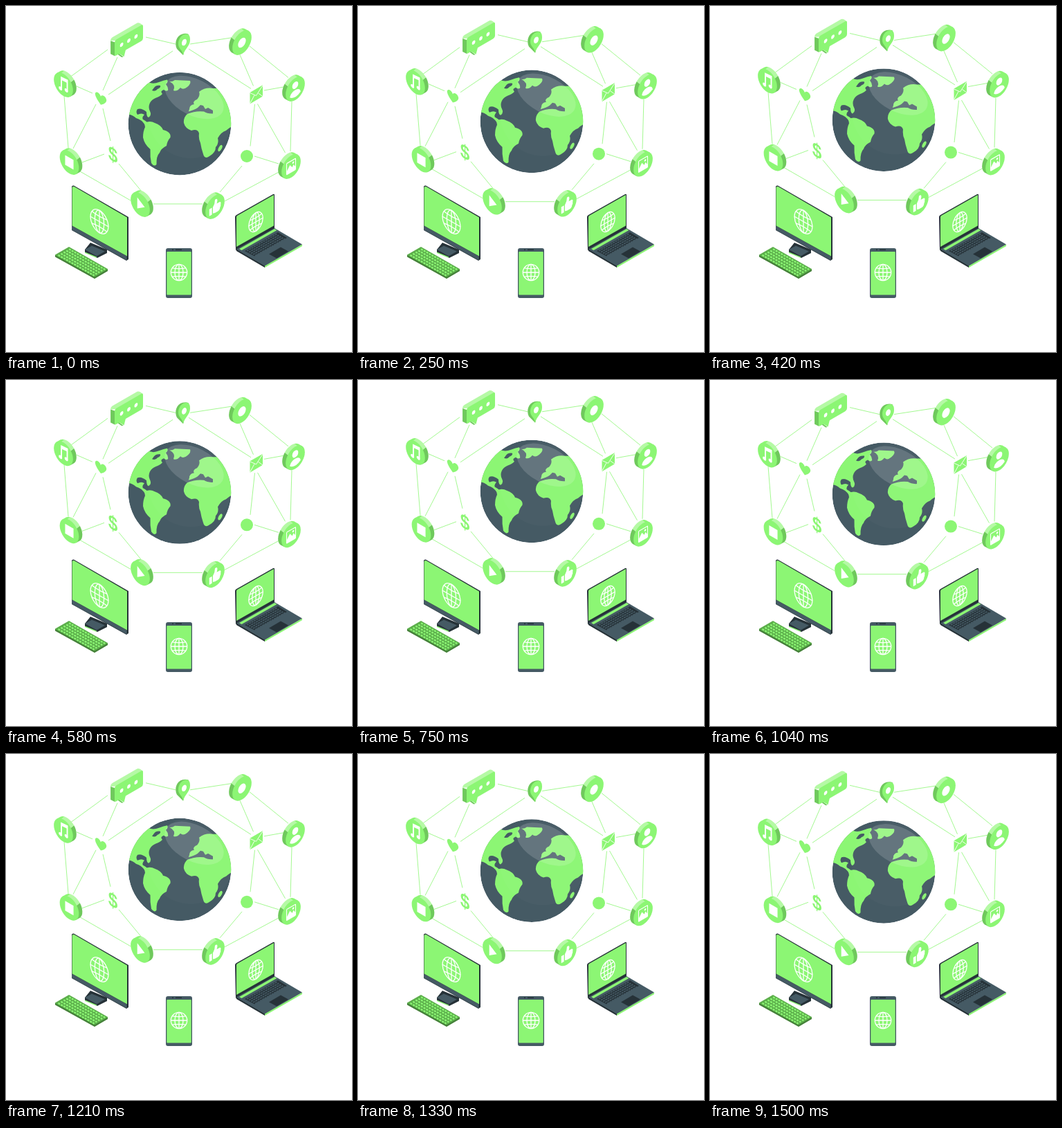
Animation, 500 px wide and 500 px high, one loop 1540 ms. Source, as an HTML page:

```html
<!DOCTYPE html>
<html lang="en">
<head>
<meta charset="utf-8">
<title>Connected world</title>
<style>
  html, body { margin: 0; width: 100%; height: 100%; overflow: hidden; background: #fff; }
  svg { display: block; width: 100vw; height: 100vh; }
  .g { fill: #8cf674; }
  .d { fill: #6fc95c; }
  .light { fill: #b5f9a5; }
  .slate { fill: #455a64; }
  .mid { fill: #37474f; }
  .dark { fill: #263238; }
  .w { fill: #fff; }
  .net { stroke: #8cf674; stroke-width: .8; fill: none; }
  .wire { stroke: #fff; stroke-width: 1.3; fill: none; }
  .wire > * { vector-effect: non-scaling-stroke; }
  .thin { stroke-width: .9; }
</style>
</head>
<body>
<svg viewBox="0 0 500 500">
  <defs>
    <linearGradient id="rim" gradientUnits="userSpaceOnUse" x1="-11" y1="-11" x2="14" y2="10">
      <stop offset=".08" stop-color="#8cf674"/>
      <stop offset=".1" stop-color="#b5f9a5"/>
      <stop offset=".56" stop-color="#b5f9a5"/>
      <stop offset=".58" stop-color="#6fc95c"/>
    </linearGradient>
    <g id="disc">
      <path fill="url(#rim)" d="M-11.3-11.3l6.3-6.2A16 16 0 0 1 17.6 5.1L11.3 11.3Z"/>
      <circle class="g" r="16"/>
    </g>
    <g id="web" class="wire">
      <circle r="11.700"/><ellipse rx="6" ry="11.700"/>
      <path d="M0-12V12M-12 0H12M-10-6.3Q0-4.5 10-6.3M-10 6.3Q0 4.5 10 6.3"/>
    </g>
    <clipPath id="ball"><circle cx="251" cy="170.2" r="74.3"/></clipPath>
  </defs>

  <!-- monitor and keyboard -->
  <path class="dark" d="M122 342L146 352V357L132 364 114 356V352Z"/>
  <path class="g" d="M114 355.500L131 362.500V364L114 357Z"/>
  <path class="slate" d="M114 352L124 346.500 143 354.500 131 361.500Z"/>
  <path class="dark" d="M95 261.500Q95 259 98 259.500L177 305V366L174 368 95 324Z"/>
  <path class="slate" d="M95 317.500L174.500 361.500V367.500L95 323.500Z"/>
  <path class="g" d="M95.500 262.500Q96 260 99 261.200L175 305.500V361.500L95.500 317.500Z"/>
  <use href="#web" transform="matrix(1.1 .63 0 1.38 135 311.500)"/>
  <path fill="#5cae4b" d="M71 359.500L91 348 147 380V382.500L128 394 71 362Z"/>
  <path fill="#45803a" d="M71 360L128 391.500V394L71 362.500ZM128 391.500L147 380.500V383L128 394Z"/>
  <g stroke="#8cf674" stroke-width="2.300" stroke-dasharray="3 1.400" id="keys"></g>

  <!-- laptop -->
  <path class="dark" d="M331 305Q331 303 333 302L386 272Q388 271 388 273V322L332 353Z"/>
  <path class="g" d="M333 305Q333 303.500 334.500 302.700L387 273V317.500L333 348Z"/>
  <path class="dark" d="M333 351L374 375V378L333 354Z"/>
  <path class="g" d="M374 375L428 344.500V347L374 378Z"/>
  <path class="slate" d="M333 351.500L388 321 428 344.500 374 375.500Z"/>
  <path class="g" d="M337 351L388 322 391.500 324 340.500 353Z"/>
  <use href="#web" transform="matrix(.87 -.5 0 1.13 361 312)"/>
  <path class="dark" d="M345 354L393 327 406 335 359 361.500Z"/>
  <g stroke="#455a64" stroke-width="1.700" stroke-dasharray="3 .9" id="laptopKeys"></g>
  <path class="dark" d="M380 358.500L397 348.500 408 354.500 391 364.500Z"/>

  <!-- phone -->
  <rect class="slate" x="231" y="350" width="38" height="72" rx="3"/>
  <rect class="g" x="232.300" y="355" width="35.400" height="62.500" rx="1"/>
  <path class="dark" d="M245 351.500h9v1.500h-9ZM240 351.500h2v1.500h-2Z"/>
  <use href="#web" transform="translate(250 385)"/>

  <g id="float">
    <path class="net" d="M202 45L245 55M266 55L328 45.500M352 58L408 103.500M338 70.500L357.500 115.500M264 62L354 119.500
      M373 122L401 117M363.500 141.500L403.500 212M359.500 142L353 202.500M147 63L93.500 102M161 74L140 122M241 65L148 128
      M102 116L125 126M130 142L97 206M140 148L151 195M142 214L110 226M163 228L196 268M107 239L180 281
      M84 130L90 205M213 286H284M309 269L341 231M316 282L396 239M359 217L394 228M413 138L411 210"/>

    <!-- globe -->
    <g clip-path="url(#ball)">
      <circle class="slate" cx="251" cy="170.200" r="74.300"/>
      <g class="g">
        <path d="M170 158L172 130 200 106 208 111Q214 113 221 110T233 106.500Q235 110 231 113 235 118 234 122
          231 124 228 121 222 123 226 127C221 133 212 132 208 140Q205 146 208 152T206 161Q203 160 203 153
          Q196 147 190 149 187 153 190 157 196 154 200 157 196 161 198 164 204 167 205 170L201 172Q196 164 188 162 182 157 178 157Z"/>
        <path d="M200 169Q208 165 215 169 224 172 227 179 239 182 237.500 190 233 195 232 202 224 206 222 212
          217 217 217.500 229 214 233 210 227 208 218 208.500 207 200 200 198 190 198 181 201 175Z"/>
        <path d="M236 109Q240 110 244 107L266 108Q268 112 262 117T252 118Q247 124 242 122 246 114 236 109Z"/>
        <path d="M265 149Q265 143 272 142 269 138 276 135 281 129 279 124 288 117 299 119L310 119 330 150V172
          Q322 176 318 180 311 182 306 191 308 198 303 204 303 212 294 217 287 222 285 214 282 205 281 198
          278 192 279 184 277 177 268 180 259 177 257 169 256 161 263 155Z"/>
        <ellipse cx="309.500" cy="205.500" rx="2.300" ry="5" transform="rotate(28 309.500 205.500)"/>
      </g>
      <path class="slate" d="M211 122Q216 124 219 120 224 118 223 115 217 114 214 118Z"/>
      <path class="slate" d="M262 153Q273 150 277 147L281 143 285 144 288 149 292 147 299 151V155.500Q291 156 286 152.500 274 151 262 156Z"/>
      <circle class="w" opacity=".02" cx="267" cy="158" r="62"/>
      <ellipse class="w" opacity=".15" cx="272" cy="132" rx="46" ry="26" transform="rotate(27 272 132)"/>
    </g>

    <!-- speech bubble -->
    <g transform="matrix(.866 -.5 0 1 177.500 50)">
      <path class="d" d="M-30.500-15L-23-9V11L-30.500 4ZM-17 10L-9 19 -12 18-20 9Z"/>
      <path class="light" d="M-30.500-15Q-30.500-18.500-27-18.500H14Q17-18.500 23-11L-22-11Z"/>
      <rect class="g" x="-23.700" y="-12" width="47.400" height="23" rx="3"/>
      <path class="g" d="M-17 10H-5L-8 19Z"/>
      <circle class="w" cx="-12" r="2.800"/><circle class="w" r="2.800"/><circle class="w" cx="12" r="2.800"/>
    </g>

    <!-- map pin -->
    <path class="d" d="M256 71Q252 67 247 62C243 54 246 43 255 40.500Q260 39 264 41Z"/>
    <path class="g" d="M256 71C255 63 249 62 249 55 249 47 254 41 260 40.500S266 46 266 49C266 58 258 62 256 71Z"/>
    <ellipse class="w" cx="257.500" cy="52.500" rx="3.200" ry="5" transform="rotate(22 257.500 52.500)"/>

    <!-- left-facing badges -->
    <g transform="matrix(.866 .5 0 1 83 114)">
      <use href="#disc"/>
      <path class="w" d="M-4.500-10L7.500-11V5.500H5.300V-6L-2.300-5.300V7.500H-4.500Z"/>
      <ellipse class="w" cx="-5" cy="7.500" rx="2.900" ry="2.500"/><ellipse class="w" cx="4.800" cy="5.500" rx="2.900" ry="2.500"/>
    </g>
    <g transform="matrix(.866 .5 0 1 91.500 226)">
      <use href="#disc"/><rect class="w" x="-7" y="-7" width="14" height="14"/>
    </g>
    <g transform="matrix(.866 .5 0 1 194 287)">
      <use href="#disc"/><path class="w" d="M-5-8L7.500 0-5 8Z"/>
    </g>

    <!-- right-facing badges -->
    <g transform="matrix(.866 -.5 0 1 341 53)">
      <use href="#disc" transform="scale(-1 1)"/><circle class="w" r="6.500"/>
    </g>
    <g transform="matrix(.866 -.5 0 1 418 120)">
      <use href="#disc" transform="scale(-1 1)"/>
      <circle class="w" cy="-5.500" r="5"/><path class="w" d="M-9 8C-8-1 8-1 9 8Q0 15-9 8Z"/>
    </g>
    <g transform="matrix(.866 -.5 0 1 412 232)">
      <use href="#disc" transform="scale(-1 1)"/>
      <rect class="wire" x="-7.500" y="-8" width="15" height="16" rx="1"/>
      <path class="w" d="M-7.500 8V4L-2-3 2 2 4-1 7.500 4V8Z"/><circle class="w" cx="3.500" cy="-4" r="1.500"/>
    </g>
    <g transform="matrix(.866 -.5 0 1 302 290)">
      <use href="#disc" transform="scale(-1 1)"/>
      <path class="w" d="M-9.500-1H-5V9H-9.500ZM-3.500-1Q0-4 0-10 4-11 4-7L3-3H8Q10.500-2 9.500 1 10 4 8.500 5 8 9 5 9H0L-3.500 8Z"/>
    </g>

    <!-- loose symbols -->
    <path class="g" transform="matrix(.82 .47 0 .92 137 134.500)" d="M0 9C-7 4-10 0-10-3.500-9-9-2-9 0-4 2-9 9-9 10-3.500 10 0 7 4 0 9Z"/>
    <text class="g" transform="matrix(.84 .48 0 1 154.500 214.500)" y="10" text-anchor="middle"
      font-family="'Liberation Sans', sans-serif" font-size="29" font-weight="700">$</text>
    <circle class="g" cx="348" cy="217" r="9"/>
    <path class="g" d="M352.500 125L371 114.300V130.500L352.500 141.500Z"/>
    <path class="wire thin" d="M352.500 125.500L361.500 129.500 371 114.800M352.500 141L359 129M371 130.500L364.500 126"/>
  </g>
</svg>
<script>
  const $ = id => document.getElementById(id);

  // rows of keys as dashed strokes, stepped from the first row
  function rows(id, n, x, y, dx, dy, w, h) {
    for (let i = 0; i < n; i++) {
      const p = document.createElementNS('http://www.w3.org/2000/svg', 'path');
      p.setAttribute('d', `M${x + dx * i} ${y + dy * i}l${w} ${h}`);
      $(id).append(p);
    }
  }
  rows('keys', 5, 75.5, 360, 3.9, -2.2, 52, 29.7);
  rows('laptopKeys', 5, 348, 354, 3, 1.7, 44, -24.8);

  const LOOP = 1540, STEP = LOOP / 37, PERIOD = 1520, LEAD = 35, RISE = 10;
  const lift = t => RISE * (1 - Math.abs(1 - 2 * (t % PERIOD) / PERIOD));
  const start = performance.now();

  function draw() {
    const t = Math.max(0, performance.now() - start) % LOOP;
    const tick = Math.floor((t + 4) / STEP) % 37 * STEP;
    $('float').setAttribute('transform', `translate(0 ${(lift(LEAD) - lift(tick + LEAD)).toFixed(2)})`);
    requestAnimationFrame(draw);
  }
  draw();
</script>
</body>
</html>
```
